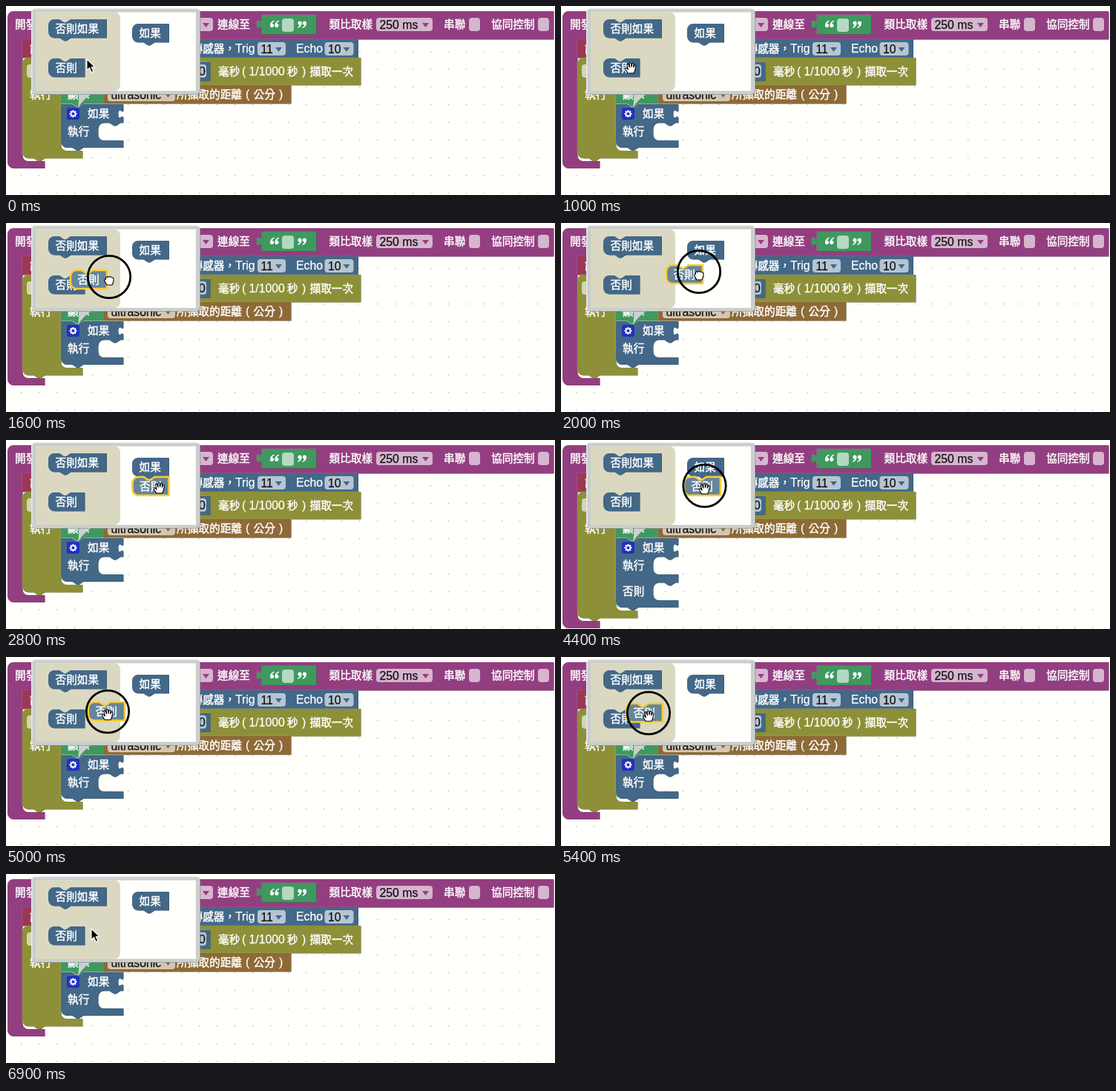
An HTML page that plays this animation: 740x256 px, repeating every 7000 ms.

```html
<!DOCTYPE html>
<html lang="zh-Hant">
<head>
<meta charset="utf-8">
<style>
html, body { margin: 0; width: 100%; height: 100%; overflow: hidden; background: #fffffb; }
svg { display: block; width: 740px; height: 256px; }
text { font-family: "Liberation Sans", "Noto Sans CJK TC", "Noto Sans CJK", sans-serif; font-size: 15.8px; white-space: pre; }
.zh { font-family: "Noto Sans CJK TC", "Noto Sans CJK", sans-serif; font-size: 14.67px; font-weight: 500; stroke: #fff; stroke-width: .45; }
</style>
</head>
<body>
<svg id="stage" viewBox="0 0 740 256"></svg>
<script>
const stage = document.getElementById('stage');
const PURPLE = '#933e80', MAROON = '#9c3856', OLIVE = '#8d9038', TEAL = '#436888', GREEN = '#3f995f', BROWN = '#8e6a37';
const NOTCH = 'l6,4 3,0 6,-4', TAB = 'l-6,4 -3,0 -6,-4';

function el(name, attrs, parent = stage, text) {
  const n = document.createElementNS('http://www.w3.org/2000/svg', name);
  for (const k in attrs) n.setAttribute(k, attrs[k]);
  if (text) n.textContent = text;
  parent.appendChild(n);
  return n;
}
const rect = (x, y, width, height, fill, rx = 0, p) => el('rect', { x, y, width, height, fill, rx }, p);
const zh = (x, y, s, p) => el('text', { x, y, class: 'zh', fill: '#fff' }, p, s);
const latin = (x, y, s, fill = '#fff') => el('text', { x, y, fill, stroke: fill, 'stroke-width': .25 }, stage, s);
const move = (n, x, y) => n.setAttribute('transform', `translate(${x} ${y})`);
const show = (n, on) => n.setAttribute('display', on ? 'inline' : 'none');

// Bevelled block; returns a function that sets its outline
function block(fill, d, parent) {
  const g = el('g', {}, parent);
  const layers = [
    el('path', { fill, transform: 'translate(.5 .5)' }, g),
    el('path', { fill: '#000', opacity: .3, transform: 'translate(.5 .5)' }, g),
    el('path', { fill: '#fff', opacity: .3, transform: 'translate(-.3 -.3)' }, g),
    el('path', { fill }, g)
  ];
  const set = p => layers.forEach(n => n.setAttribute('d', p));
  set(d);
  return set;
}

function field(x, y, w, color, s, arrow = true) {
  rect(x, y, w, 18, color, 4);
  rect(x, y, w, 18, 'rgba(255,255,255,.62)', 4);
  if (s) latin(x + 4.5, y + 14.7, s, '#111');
  if (arrow) el('path', { d: `M${x + w - 14},${y + 7}h9l-4.5,6z`, fill: color });
}

// Statement mouth whose ceiling is at y, drawn from the right
const mouth = (x, y, h, right) =>
  `V${y}H${x + 30}${TAB}h-7a8,8 0 0 0 -8,8V${y + h - 8}a8,8 0 0 0 8,8H${right}`;

// C-shaped outline with one mouth
const wrap = (x, y, right, inner, top, floor, arm, bottom, tab) =>
  `M${x},${y + 8}a8,8 0 0 1 8,-8H${right}${mouth(inner, top, floor - top, arm)}V${bottom}` +
  `${tab ? `H${x + 30}${TAB}` : ''}H${x + 8}a8,8 0 0 1 -8,-8z`;

const purplePath = e => wrap(2, 7, 738, 22, 45, 210 + e, 52, 219.5 + e, false);
const olivePath = e => wrap(22, 70, 478, 74, 107, 196 + e, 103, 206 + e, true);
const ifPath = e => `M74,133h15${NOTCH}H158v7c0,8 -7,-6 -7,6s7,-2 7,6` +
  mouth(124, 158, 24, 158) + (e ? mouth(124, 193, 24, 158) : '') +
  `V${191.5 + e}H104${TAB}H82a8,8 0 0 1 -8,-8z`;

// Workspace dots
for (let x = 20; x < 740; x += 24)
  for (let y = 13; y < 256; y += 24) rect(x, y, 1.3, 1.3, '#b4b4b4');

// Top row
const setPurple = block(PURPLE, purplePath(0));
zh(12, 30, '開發板');
field(225, 16, 54, PURPLE);
zh(285, 30, '連線至');
block(GREEN, 'M345,12H418V38H345V31c0,-8 -7,6 -7,-6s7,2 7,-6z');
field(372, 17, 16, GREEN, '', false);
const drop = 'M5.6,0C2,1 0,3.6 0,7a2.6,2.6 0 1 0 2.8,-2.6C3,3 4,2 5.6,1.2z';
for (const t of ['translate(356 19.5)', 'translate(405 30) rotate(180)']) {
  const q = el('g', { transform: t, fill: '#fff' });
  el('path', { d: drop }, q);
  el('path', { d: drop, transform: 'translate(6.4 0)' }, q);
}
zh(435.5, 30, '類比取樣');
field(499, 16, 76, PURPLE, '250 ms');
zh(590, 30, '串聯');
field(624, 16, 15, PURPLE, '', false);
zh(654, 30, '協同控制');
field(717, 16, 15, PURPLE, '', false);

// Sensor row
block(MAROON, `M22,45h15${NOTCH}H240V70H52${TAB}H22z`);
zh(32, 63, '設');
block(TEAL, 'M200,45H474.5V70H200z');
zh(250.5, 63, '傳感器，');
latin(309, 63, 'Trig');
field(339, 49, 38, TEAL, '11');
latin(391, 63, 'Echo');
field(429.5, 49, 39, TEAL, '10');

// Timer row
const setOlive = block(OLIVE, olivePath(0));
field(28, 79, 30, OLIVE, '', false);
block(TEAL, 'M220,76H275V101H220z');
field(236, 79, 34, TEAL, '', false);
latin(260, 94, '0', '#111');
zh(286, 93.5, '毫秒');
latin(318, 93.5, '(');
latin(327.5, 94, '1/1000');
zh(379, 93.5, '秒');
latin(399, 93.5, ')');
zh(409.5, 93.5, '擷取一次');
zh(32, 125, '執行');

// Display row
block(GREEN, `M74,107h15${NOTCH}H131V132H104${TAB}H74z`);
zh(83, 125, '顯示');
block(BROWN, 'M131,107H384V132H131z');
field(137, 111, 91, BROWN, 'ultrasonic');
zh(230, 125, '所擷取的距離');
latin(323, 125, '(');
zh(333.5, 125, '公分');
latin(368, 125, ')');

// If block
const setIf = block(TEAL, ifPath(0));
rect(82, 138, 17, 16, '#2030c0', 3);
const gear = el('g', { transform: 'translate(90.5 146)' });
for (let a = 0; a < 360; a += 45)
  el('rect', { x: -1, y: -5, width: 2, height: 2.5, fill: '#fff', transform: `rotate(${a})` }, gear);
el('circle', { r: 2.9, fill: 'none', stroke: '#fff', 'stroke-width': 1.6 }, gear);
zh(110, 151, '如果');
zh(83, 175, '執行');
const elseLabel = zh(83, 210, '否則');

// Mutator bubble
el('path', { d: 'M98,118H117Q104,126 97,138Q99,128 98,118z', fill: '#ccd0cf' });
rect(35, 4, 227, 116, '#989b98', 5);
rect(34, 3, 227, 116, '#e6e8e8', 5);
rect(35.5, 4.5, 225, 114, '#c9cdcc', 4);
rect(40, 8.5, 216, 106.5, '#fffffb');
el('path', { d: 'M40,8.5H146a8,8 0 0 1 8,8V107a8,8 0 0 1 -8,8H40z', fill: '#dad8c0' });

const elsePath = `M0,8a8,8 0 0 1 8,-8H15${NOTCH}H49V25H8a8,8 0 0 1 -8,-8z`;
function piece(x, y, d, s) {
  const g = el('g', { transform: `translate(${x} ${y})` });
  block(TEAL, d, g);
  zh(9.5, 17.5, s, g);
}
piece(57, 18, `M0,8a8,8 0 0 1 8,-8H15${NOTCH}H78.5V25H30${TAB}H8a8,8 0 0 1 -8,-8z`, '否則如果');
piece(57, 71, elsePath, '否則');
piece(170, 24, `M0,8a8,8 0 0 1 8,-8H49.5V25H30${TAB}H8a8,8 0 0 1 -8,-8z`, '如果');

const held = el('g', {});
el('path', { d: elsePath, fill: '#658699', stroke: '#fc3', 'stroke-width': 2.6 }, held);
zh(9.5, 17.5, '否則', held);

// Pointer
const ring = el('circle', { r: 28.7, fill: 'none', stroke: '#000', 'stroke-width': 2.8 });
const ink = { fill: '#fff', stroke: '#000', 'stroke-width': 1.1, 'stroke-linejoin': 'round' };
const arrow = el('path', { ...ink, fill: '#000', stroke: '#fff', d: 'M0,0V15l3.6,-3.3 2.6,6 2.6,-1.1 -2.6,-5.8h4.8z' });
const open = el('path', { ...ink, d: 'M-4,9L-7,4Q-8,1 -5.5,2L-3.5,4L-5,-2.5Q-4.5,-4.5 -3,-3L-1.5,1L-1.8,-4.5Q-.5,-6 .5,-4.5L1,.5L2,-4.2Q3.5,-5 4,-3.5L3.7,1L5.2,-2Q6.8,-2.5 6.8,-.5L5.5,6L4,9z' });
const fist = el('path', { ...ink, d: 'M-3,9L-6,4Q-6.5,1.5 -4.5,1V-1Q-3,-3 -1.5,-1.5Q0,-3.4 1.5,-1.7Q3,-2.7 4,-1Q6,-1.4 6,1V4L4,9z' });

// [time, x, y]
const path = [[0, 109, 72], [500, 108, 73], [1000, 94, 80], [1300, 94, 80], [1600, 139, 73], [2000, 186, 66],
  [2400, 207, 61], [3300, 206, 61], [4100, 197, 62], [4400, 193.5, 62], [5000, 137, 74], [5400, 118, 76],
  [5800, 115, 75], [6900, 115, 74]];
const drag = [[1300, 57, 71], [1600, 87, 64], [2000, 142, 57], [2400, 169, 51], [2600, 170.5, 50],
  [4200, 170.5, 50], [4400, 166, 50], [5000, 111, 61], [5400, 88, 63], [5800, 85, 63]];

function at(keys, t) {
  let i = 1;
  while (i < keys.length - 1 && keys[i][0] < t) i++;
  const [a, b] = [keys[i - 1], keys[i]];
  const k = Math.min(1, Math.max(0, (t - a[0]) / (b[0] - a[0])));
  return [a[1] + (b[1] - a[1]) * k, a[2] + (b[2] - a[2]) * k];
}
const within = (t, a, b) => t >= a && t < b;

function draw(t) {
  // The block reshapes just after the piece joins or leaves
  const e = within(t, 2900, 4500) ? 35 : 0;
  setPurple(purplePath(e));
  setOlive(olivePath(e));
  setIf(ifPath(e));
  show(elseLabel, e);

  show(held, within(t, 1200, 5800));
  move(held, ...at(drag, t));

  const [x, y] = at(path, t);
  const pointing = t < 900 || t >= 5800;
  const gripping = within(t, 1300, 2700);
  show(ring, within(t, 1200, 2700) || within(t, 4200, 5800));
  show(arrow, pointing);
  show(fist, gripping);
  show(open, !pointing && !gripping);
  move(ring, x, y);
  move(arrow, x, y);
  move(open, x, y + 2);
  move(fist, x, y + 2);
}

const start = performance.now();
function tick() {
  const t = (performance.now() - start) % 7000;
  draw(Math.floor(t / 100) * 100);
  requestAnimationFrame(tick);
}
tick();
</script>
</body>
</html>
```
